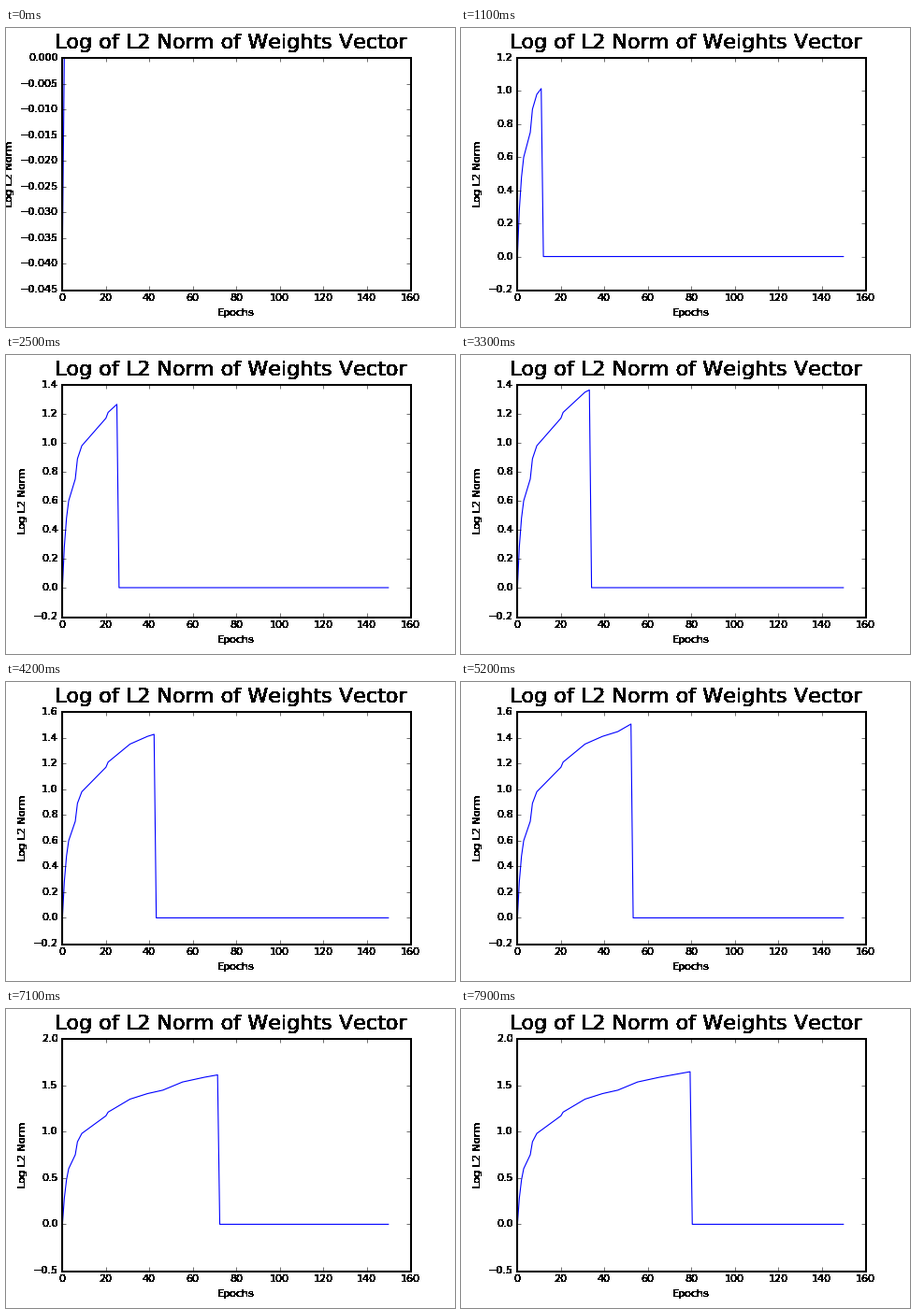
A matplotlib script for the animation above (8000 ms loop, 480x320 px).

```python
import numpy as np
import matplotlib.pyplot as plt
from matplotlib.animation import FuncAnimation
from matplotlib.patches import Rectangle
from matplotlib.transforms import IdentityTransform

FRAMES, STEP_MS, EPOCHS = 80, 100, 150

plt.style.use("classic")
plt.rcParams.update({
    "font.family": "DejaVu Sans",
    "font.size": 10,
    "text.kerning_factor": 6,
    "figure.facecolor": "white",
    "savefig.facecolor": "white",
    "figure.subplot.bottom": 0.125,
    "savefig.dpi": "figure",
})

# Bends of the learning curve: update count and log norm
BENDS = [(0, -0.0425), (1, 0.28), (2, 0.48), (3, 0.60), (6, 0.75), (7, 0.89),
         (9, 0.98), (20, 1.17), (21, 1.21), (31, 1.35), (39, 1.41),
         (46, 1.447), (55, 1.535), (64, 1.582), (79, 1.646)]

x = np.linspace(0, EPOCHS, EPOCHS)
count = np.arange(EPOCHS)
log_norm = np.interp(count, *zip(*BENDS))


def solid(img, dpi):
    """Turn every visibly touched pixel fully black."""
    out = np.zeros_like(img)
    out[..., 3] = img[..., 3] > 0.05
    return out, 0, 0


fig, ax = plt.subplots(figsize=(6, 4), dpi=80)
line, = ax.plot(x, np.zeros(EPOCHS), "b")
title = fig.suptitle("Log of L2 Norm of Weights Vector", fontsize=20)
ax.set_xlabel("Epochs")
ax.set_ylabel("Log L2 Norm")

# Two-pixel frame around the axes
fig.add_artist(Rectangle((60, 39), 373, 249, fill=False, ec="black", lw=1.8,
                         transform=IdentityTransform()))


def update(i):
    line.set_ydata(np.where(count <= i, log_norm, 0))
    ax.relim()
    ax.autoscale_view()
    labels = ax.get_xticklabels() + ax.get_yticklabels()
    for text in [title, ax.xaxis.label, ax.yaxis.label, *labels]:
        text.set_agg_filter(solid)
    return line,


anim = FuncAnimation(fig, update, frames=FRAMES, init_func=lambda: (line,),
                     interval=STEP_MS, repeat=True, repeat_delay=0, blit=False)
plt.show()
```
